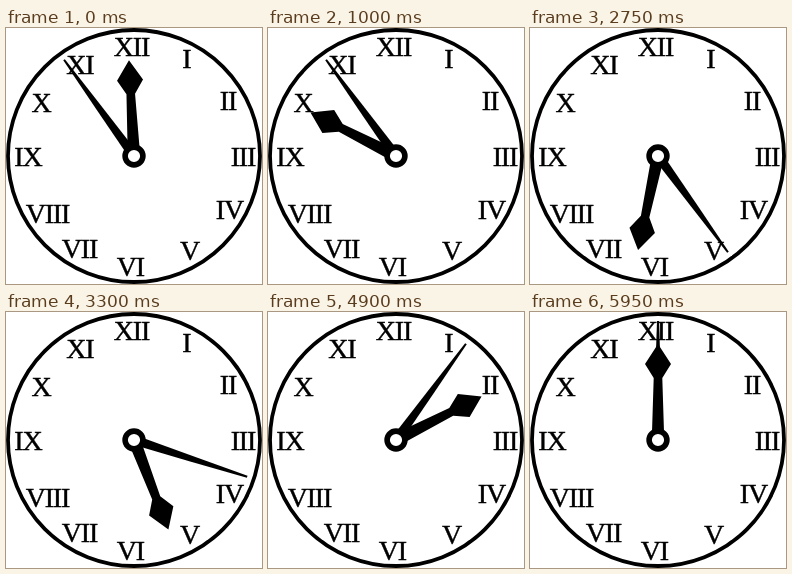
An HTML page for the animation above (6000 ms loop, 256 by 256 pixels).

```html
<!DOCTYPE html>
<html lang="en">
<head>
<meta charset="utf-8">
<title>Backward clock</title>
<style>
  html, body { margin: 0; width: 100%; height: 100%; overflow: hidden; background: #fff; }
  svg { display: block; width: 100vw; height: 100vh; }
  text {
    font: 28px "Liberation Serif", serif;
    letter-spacing: -1.2px;
    text-anchor: middle;
    stroke: #000;
    stroke-width: .4px;
  }
</style>
</head>
<body>
<svg viewBox="0 0 256 256">
  <circle cx="128" cy="128" r="126" fill="#fff" stroke="#000" stroke-width="3.8"/>
  <g id="numerals"></g>
  <g transform="translate(128 128)">
    <path id="hour" d="M0-96 13-76 4.3-62 6-8H-6L-4.3-62-13-76Z"/>
    <path id="minute" d="M-1-119H1L3-60 4.6-8H-4.6L-3-60Z"/>
    <circle r="8.9" fill="#fff" stroke="#000" stroke-width="5.6"/>
  </g>
</svg>
<script>
  const LOOP = 6000, STEP = 50;
  const $ = id => document.getElementById(id);

  // Centre of each numeral
  const numerals = {
    XII: [126, 18.5], I: [181, 31], II: [222.5, 73], III: [237.5, 129],
    IV: [224, 182], V: [184, 223], VI: [125, 239], VII: [74, 221],
    VIII: [42, 186], IX: [22.5, 129], X: [35.5, 75], XI: [74.5, 37]
  };
  for (const [label, [x, y]] of Object.entries(numerals)) {
    const text = document.createElementNS("http://www.w3.org/2000/svg", "text");
    text.textContent = label;
    text.setAttribute("x", x - 0.6);
    text.setAttribute("y", y + 9);
    $("numerals").append(text);
  }

  const turn = (id, angle) => $(id).setAttribute("transform", `rotate(${angle})`);

  // Each tick runs the clock back by six minutes
  function draw(now) {
    const ticks = Math.floor((now % LOOP) / STEP) + 1;
    turn("hour", -3 * ticks);
    turn("minute", -36 * ticks % 360);
  }

  const start = performance.now();
  function loop() {
    draw(performance.now() - start);
    requestAnimationFrame(loop);
  }
  loop();
</script>
</body>
</html>
```
